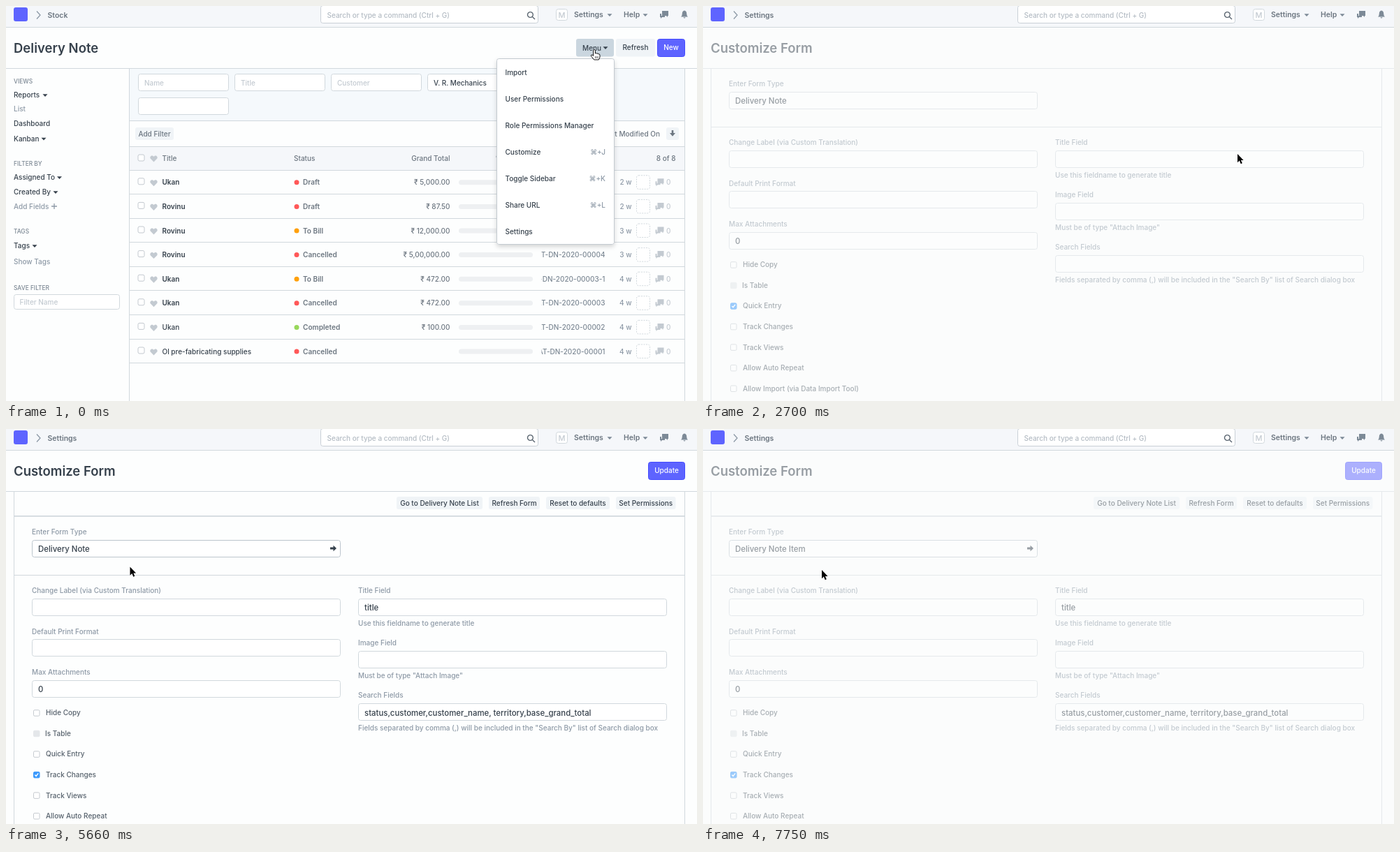
Animation, 989 px wide and 566 px high, one loop 8 s. Source, as an HTML page:

```html
<!DOCTYPE html>
<html lang="en">
<head>
<meta charset="utf-8">
<title>Customize form</title>
<style>
  html, body { margin: 0; width: 100%; height: 100%; overflow: hidden; background: #fdfefe; }
  svg { display: block; width: 989px; height: 566px; font-family: Inter, "DejaVu Sans", sans-serif; font-weight: 450; }
  text { white-space: pre; }
</style>
</head>
<body>
<svg id="stage" viewBox="0 0 989 566"></svg>
<script>
const LOOP = 8000;
const INK = '#36414c', MUTED = '#8d99a6', FAINT = '#c3cad1', LINE = '#d1d8dd', PALE = '#f0f4f7', BRAND = '#5e64ff';
const RED = '#ff5858', ORANGE = '#ffa00a', GREEN = '#98d85b';
const END = 'text-anchor="end"', MID = 'text-anchor="middle"', MEDIUM = 'font-weight="500"', BOLD = 'font-weight="600"';

// Drawing helpers; text is placed by the middle of its capitals.
const text = (x, y, s, fill = INK, size = 10, attrs = '') =>
  `<text x="${x}" y="${(y + size * .364).toFixed(2)}" fill="${fill}" font-size="${size}" ${attrs}>${s}</text>`;
const rect = (x, y, w, h, fill, attrs = '') =>
  `<rect x="${x}" y="${y}" width="${w}" height="${h}" fill="${fill}" ${attrs}/>`;
const path = (x, y, d, attrs) => `<path transform="translate(${x} ${y})" d="${d}" ${attrs}/>`;
const hline = (x, y, w, fill = LINE, h = 1) => rect(x, y, w, h, fill);
const box = (x, y, w, h, stroke = LINE, fill = '#fff', r = 3) =>
  rect(x + .5, y + .5, w - 1, h - 1, fill, `rx="${r}" stroke="${stroke}"`);
const caret = (x, y, fill = INK) => path(x, y, 'M-3.5-1.8H3.5L0 2Z', `fill="${fill}"`);
const button = (x, y, w, h, label, fill = PALE, ink = INK) =>
  rect(x, y, w, h, fill, 'rx="3"') + text(x + w / 2, y + h / 2, label, ink, 10, MID);
const primary = (x, w, label) =>
  box(x, 47, w, 26, '#444bff', BRAND) + text(x + w / 2, 59.8, label, '#fff', 10, `${MID} ${MEDIUM}`);
const heart = (x, y) =>
  path(x, y, 'M0 5L-4.6.3C-6.6-2.2-3.2-6.2 0-2.8C3.2-6.2 6.6-2.2 4.6.3Z', `fill="${FAINT}"`);
const chat = (x, y, fill) =>
  path(x, y, 'M-6-1H-4V2H1V4H-3L-5 6V4H-6ZM-3-5H6V2H5V4L3 2H-3Z', `fill="${fill}"`);

function check(y, kind = '') {
  const off = kind === 'disabled', on = kind === 'on', pending = kind === 'pending';
  const fill = on ? '#3b99fc' : off ? '#e4e7ea' : pending ? '#d3d7db' : '#fff';
  const edge = on || kind === 'focus' ? '#3b99fc' : off ? '#e4e7ea' : '#c6cbd0';
  return box(39, y - 4.5, 9.5, 9.5, edge, fill, 1.5) + (on || pending
    ? path(43.7, y, 'M-2.4.2L-.6 2L2.5-2', 'fill="none" stroke="#fff" stroke-width="1.4"') : '');
}

// Progress that advances in n equal holds, the first at a and the last at b.
const steps = (t, a, b, n) =>
  t < a ? 0 : Math.min(1, (Math.floor((t - a) / (b - a) * (n - 1) + 1e-6) + 1) / n);
const ease = p => p * p * (3 - 2 * p);

const moves = [
  [300, 1050, 6, 765, 212],
  [3890, 4480, 5, 185, 166],
  [5070, 5660, 5, 177.5, 197.5],
  [5810, 5960, 2, 170, 202]
];
function pointer(t) {
  let x = 842, y = 62;
  for (const [a, b, n, toX, toY] of moves) {
    const p = ease(steps(t, a, b, n));
    x += (toX - x) * p;
    y += (toY - y) * p;
  }
  return [x, y];
}
function cursor(t) {
  const [x, y] = pointer(t);
  return t < 1650
    ? path(x, y, 'M-1.4 1.4Q0-.6 1.4 1.4V6Q3 5 3.8 6.2Q5.2 5.4 6 6.8Q8 6.4 8 8.6V11.2L6.4 15H-.4L-4.6 9.6Q-4.8 7.4-2.8 8.2L-1.4 9.4Z',
        'fill="#fff" stroke="#111" stroke-linejoin="round"') +
      path(x, y, 'M1.5 10V13M3.3 10V13M5.1 10V13', 'stroke="#333" stroke-width=".7"')
    : path(x, y, 'M0 0V12.2L2.8 9.6L4.8 14.2L6.8 13.3L4.9 8.9H8.6Z',
        'fill="#000" stroke="#fff" stroke-width="1.2" paint-order="stroke"');
}

function navbar(crumb) {
  const grey = '#7d8a97';
  return rect(0, 0, 989, 30, '#f5f7fa') + hline(0, 30, 989) +
    rect(11, 2, 20, 20, BRAND, 'rx="3"') +
    path(44, 13, 'M0-5.5L5 0L0 5.5', `fill="none" stroke="${MUTED}" stroke-width="1.3"`) +
    text(59.5, 13, crumb, '#6c7680', 10.5, BOLD) +
    box(450, -1, 312, 26, '#c9d0d6') +
    text(459.5, 13, 'Search or type a command (Ctrl + G)', '#b4bcc4') +
    path(751, 12.5, 'M3.3 0A3.9 3.9 0 1 1-4.5 0A3.9 3.9 0 1 1 3.3 0ZM2.2 2.8L6 6.5', 'fill="none" stroke="#5a6570" stroke-width="1.4"') +
    box(787, 4, 17, 17, LINE) + text(795.5, 12.7, 'M', FAINT, 11, MID) +
    text(813, 12.5, 'Settings', '#6c7680', 10.5, BOLD) + caret(864, 13, grey) +
    text(884, 12.5, 'Help', '#6c7680', 10.5, BOLD) + caret(915, 13, grey) +
    chat(942, 12, grey) +
    path(971, 12, 'M0-5.5Q3.2-5 3.2-1Q3.2 2 5 3.5H-5Q-3.2 2-3.2-1Q-3.2-5 0-5.5ZM-1.5 4.2H1.5Q1.2 5.6 0 5.6Q-1.2 5.6-1.5 4.2Z', `fill="${grey}"`);
}

const heading = s => text(11, 60, s, INK, 18.5, BOLD) + hline(0, 89, 989);

const sidebar = [
  [107.5, 'VIEWS'], [127.5, 'Reports', 56], [147.5, 'List', 0, MUTED], [168, 'Dashboard'], [190, 'Kanban', 54],
  [226, 'FILTER BY'], [245.5, 'Assigned To', 76.5], [266.5, 'Created By', 71], [287, 'Add Fields', 0, MUTED],
  [323, 'TAGS'], [343.5, 'Tags', 41], [366, 'Show Tags', 0, MUTED], [404, 'SAVE FILTER']
];
const notes = [
  ['Ukan', 'Draft', RED, '5,000.00', '00006', 2],
  ['Rovinu', 'Draft', RED, '87.50', '00005', 2],
  ['Rovinu', 'To Bill', ORANGE, '12,000.00', '00004-1', 3],
  ['Rovinu', 'Cancelled', RED, '5,00,000.00', '00004', 3],
  ['Ukan', 'To Bill', ORANGE, '472.00', '00003-1', 4],
  ['Ukan', 'Cancelled', RED, '472.00', '00003', 4],
  ['Ukan', 'Completed', GREEN, '100.00', '00002', 4],
  ['Ol pre-fabricating supplies', 'Cancelled', RED, '', '00001', 4]
];
const filters = ['Name', 'Title', 'Customer', 'V. R. Mechanics', 'To Warehouse', ''];
const menuItems = [['Import'], ['User Permissions'], ['Role Permissions Manager'], ['Customize', 'J'],
  ['Toggle Sidebar', 'K'], ['Share URL', 'L'], ['Settings']];

function noteRow([title, status, color, total, id, weeks], i) {
  const y = 252.8 + 34.6 * i;
  return box(188.5, y - 6.5, 10, 10, '#c3c9cf', '#fff', 2) + heart(211.5, y + .5) +
    text(223.5, y, title, INK, 10, i < 6 ? BOLD : '') +
    `<circle cx="416" cy="${y}" r="3.5" fill="${color}"/>` +
    text(425, y, status, '#6c7680', 10.1, BOLD) +
    (total && text(635.5, y, '₹ ' + total, '#6c7680', 10, END)) +
    rect(648, y - 3.5, 106, 7, '#eef0f2', 'rx="3.5"') +
    `<g clip-path="url(#idClip)">${text(857.5, y, 'MAT-DN-2020-' + id, '#7b8793', 10, END)}</g>` +
    text(895.5, y, weeks + ' w', MUTED, 10, `${END} ${MEDIUM}`) +
    rect(902.5, y - 10, 19, 19.5, '#fff', `rx="3" stroke="${LINE}" stroke-dasharray="2 1.5"`) +
    chat(935.5, y - .5, FAINT) + text(945, y, '0', FAINT) +
    hline(177, Math.floor(y + 16.6), 794);
}

function menu(pointerY) {
  const hover = Math.floor((pointerY - 76) / 38);
  return rect(702.5, 75.5, 168, 266, '#fff', 'rx="3" stroke="#c4cbd1" filter="url(#shadow)"') +
    menuItems.map(([label, key], i) => {
      const y = 95 + 38 * i;
      return (i === hover ? rect(703, y - 19, 167, 38, PALE) : '') + text(714.5, y, label) +
        (key ? text(858, y, '⌘+' + key, MUTED, 10, END) : '');
    }).join('');
}

function listPage(t) {
  const open = t < 1050;
  const side = sidebar.map(([y, s, arrowX, ink]) => s === s.toUpperCase()
    ? text(11, y, s, '#7b8793', 8.4)
    : text(11, y, s, ink) + (arrowX ? caret(arrowX, y + .5) : '')).join('');
  const inputs = filters.map((s, i) => {
    const x = Math.round(189 + 138.1 * (i % 5)), y = i < 5 ? 97 : 131;
    return box(x, y, 130, 25) + text(x + 9, y + 13, s, i === 3 ? INK : FAINT);
  }).join('');
  return heading('Delivery Note') +
    button(816, 47, 54, 25.5, '', open ? '#cad6df' : PALE) + text(825, 60, 'Menu') + caret(858, 60) +
    button(873, 47, 56, 25.5, 'Refresh') + primary(932, 40, 'New') +
    side + path(69, 287, 'M-4 0H4M0-4V4', `stroke="${MUTED}" stroke-width="1.3"`) +
    box(11, 413, 152, 22) + text(19.5, 424, 'Filter Name', FAINT) +
    rect(177, 90, 794, 74, '#f5f9fc') + inputs + hline(177, 164, 794) +
    button(185, 174, 55, 18, 'Add Filter', PALE, '#6c7680') +
    text(936, 183, 'Last Modified On', '#6c7680', 10, END) + button(945, 174, 18, 18, '') +
    path(954, 182.5, 'M-1.3-4.5H1.3V-.5H4L0 4.2L-4-.5H-1.3Z', 'fill="#6c7680"') +
    rect(177, 201, 794, 34, '#f5f7fa') + hline(177, 201, 794) + hline(177, 235, 794) +
    box(188.5, 212.5, 10, 10, '#c3c9cf', '#fff', 2) + heart(211.5, 218.5) +
    text(223.5, 218.5, 'Title', '#6c7680') + text(412, 218.5, 'Status', '#6c7680') +
    text(635.5, 218.5, 'Grand Total', '#6c7680', 10, END) +
    text(753.5, 218.5, '% Installed', '#6c7680', 10, END) +
    text(958.5, 218.5, '8 of 8', '#6c7680', 10, END) +
    notes.map(noteRow).join('') +
    rect(176, 90, 1, 476, LINE) + rect(971, 90, 1, 476, LINE) +
    (open ? menu(pointer(t)[1]) : '');
}

const field = (x, y, label, value = '', help = '', edge = LINE) =>
  text(x, y, label, MUTED) + box(x, Math.round(y + 11.4), 442, 25, edge) +
  text(x + 9, y + 24.7, value, INK, 11.4) + (help && text(x, y + 47, help, MUTED));

function suggestions() {
  const entry = (y, s) => text(46, y, s) + text(46, y + 17, 'Stock', MUTED);
  return rect(37.5, 185.5, 441, 171, '#fff', 'rx="3" stroke="#d1d8dd" filter="url(#shadow)"') +
    rect(38, 186, 440, 50, PALE) + entry(202, 'Delivery Note Item') + entry(252, 'Delivery Note') +
    text(46, 303, 'Create a new DocType') + text(46, 338, 'Advanced Search');
}

function properties(t, loaded) {
  const settling = t >= 3750 && t < 3890;
  const quick = !loaded ? 'on' : settling ? 'focus' : '';
  const track = !loaded ? '' : settling ? 'pending' : 'on';
  const options = [['Hide Copy'], ['Is Table', 'disabled'], ['Quick Entry', quick], ['Track Changes', track],
    ['Track Views'], ['Allow Auto Repeat'], ['Allow Import (via Data Import Tool)']];
  return hline(12, 209, 959) +
    field(37, 231.5, 'Change Label (via Custom Translation)') +
    field(37, 290, 'Default Print Format') +
    field(37, 348.3, 'Max Attachments', '0') +
    options.map(([label, kind], i) => {
      const y = 406.7 + 29.55 * i;
      return check(y, kind) + text(kind === 'disabled' ? 56 : 57, y, label, '#55606b');
    }).join('') +
    field(504, 231.5, 'Title Field', loaded ? 'title' : '', 'Use this fieldname to generate title') +
    field(504, 306.8, 'Image Field', '', 'Must be of type "Attach Image"') +
    field(504, 381.8, 'Search Fields', loaded ? 'status,customer,customer_name, territory,base_grand_total' : '',
      'Fields separated by comma (,) will be included in the "Search By" list of Search dialog box');
}

function formPage(t) {
  const within = (a, b) => t >= a && t < b;
  const chosen = t >= 2700, loaded = t >= 3750, focused = t >= 4480, picked = t >= 6260;
  const veil = within(2700, 3750) || t >= 6700 ? .5 : t >= 6560 ? .25 : 0;
  const blink = within(4480, 5070) || within(5810, 6700) || within(7150, 7750);
  const type = picked ? 'Delivery Note Item' : chosen ? 'Delivery Note' : '';
  const toolbar = button(559, 97, 123, 18, 'Go to Delivery Note List') + button(691, 97, 73, 18, 'Refresh Form') +
    button(773, 97, 91, 18, 'Reset to defaults') + button(873, 97, 85.5, 18, 'Set Permissions') +
    hline(12, 124, 959, LINE, 1.7) + primary(919, 53, 'Update');
  return heading('Customize Form') + (loaded ? toolbar : '') +
    `<g transform="translate(0 ${loaded ? 0 : -36})">` +
    field(37, 147.3, 'Enter Form Type', type, '', focused ? '#bcc5cd' : LINE) +
    (focused ? path(468.5, 171, 'M-4.5-1.4H0V-4.2L4.5 0L0 4.2V1.4H-4.5Z', `fill="${INK}"`) : '') +
    (blink ? rect(picked ? 147 : 120, 164, 1, 15, '#222') : '') +
    (chosen ? properties(t, loaded) : '') +
    (within(5810, 6260) ? suggestions() : '') + '</g>' +
    rect(11, 90, 1, 476, LINE) + rect(971, 90, 1, 476, LINE) +
    (veil ? rect(0, 31, 989, 535, '#f9fcfb', `opacity="${veil}"`) : '');
}

const defs = `<defs><clipPath id="idClip"><rect x="766.5" y="236" width="92" height="276"/></clipPath>
  <filter id="shadow" x="-10%" y="-10%" width="120%" height="120%">
  <feDropShadow dx="0" dy="3" stdDeviation="3" flood-opacity=".16"/></filter></defs>`;
const stage = document.getElementById('stage');
let shown = '';

function draw(now) {
  const t = now % LOOP;
  const page = t < 1650 ? navbar('Stock') + listPage(t) : navbar('Settings') + formPage(t);
  const picture = defs + rect(0, 0, 989, 566, '#fdfefe') + page + cursor(t);
  if (picture !== shown) stage.innerHTML = shown = picture;
}
function tick() {
  draw(performance.now());
  requestAnimationFrame(tick);
}
tick();
</script>
</body>
</html>
```
